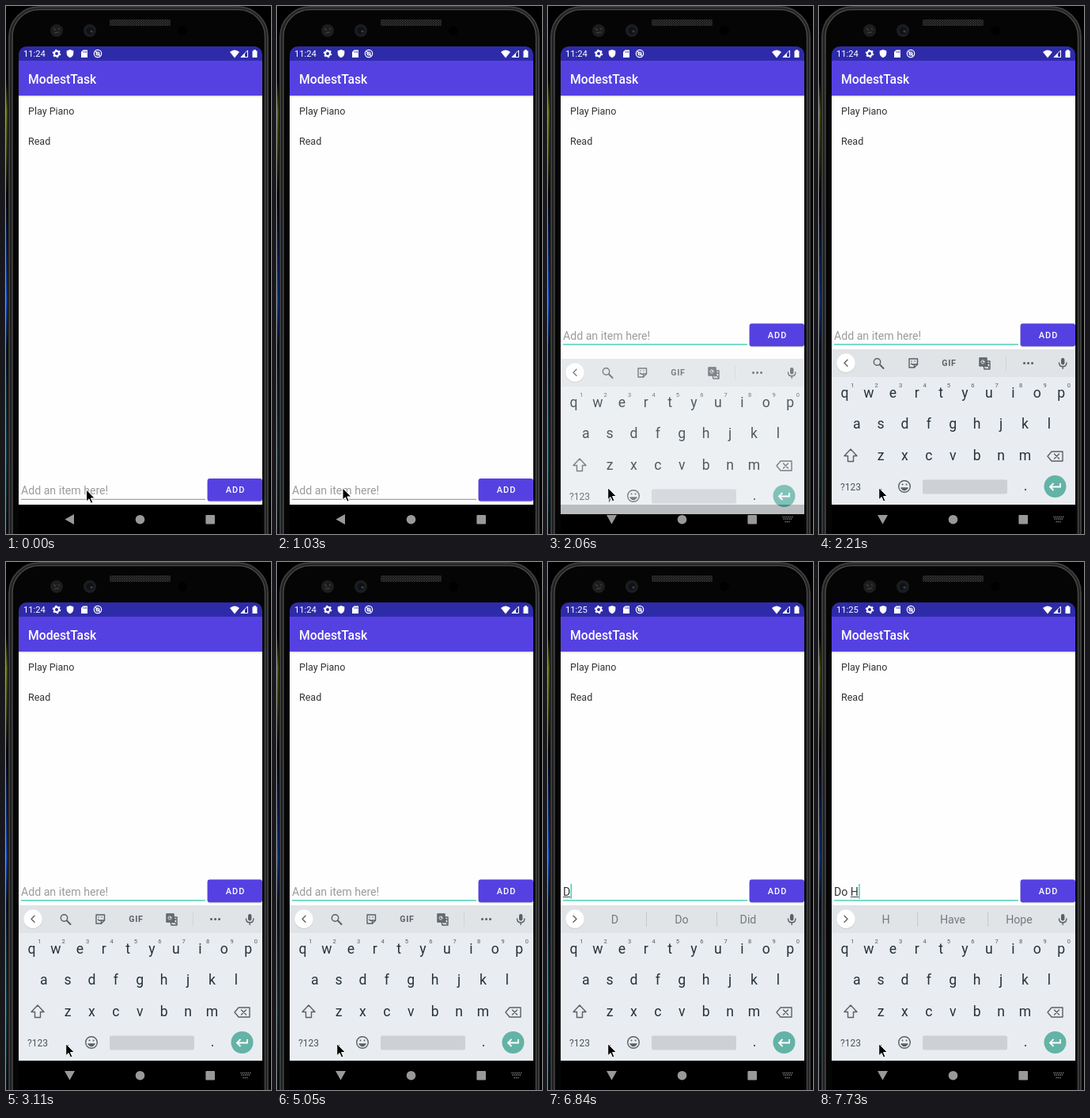
Write an HTML page that moves like this. It is 335 px wide and 666 px high and loops after 8 s.

```html
<!DOCTYPE html>
<html lang="en">
<head>
<meta charset="utf-8">
<style>
html, body { margin: 0; width: 100%; height: 100%; overflow: hidden; background: #000; }
svg { display: block; font-family: Roboto, sans-serif; }
text { white-space: pre; }
.mid { text-anchor: middle; }
.line { fill: none; stroke: #5b6065; stroke-width: 1.4; stroke-linejoin: round; stroke-linecap: round; }
</style>
</head>
<body>
<svg width="335" height="666" viewBox="0 0 335 666">
  <defs>
    <linearGradient id="wall" x2="0" y2="1">
      <stop offset=".14" stop-color="#000"/><stop offset=".2" stop-color="#5a6a10"/>
      <stop offset=".27" stop-color="#39460c"/><stop offset=".36" stop-color="#04060c"/>
      <stop offset=".48" stop-color="#0a2a70"/><stop offset=".56" stop-color="#0c48b8"/>
      <stop offset=".65" stop-color="#05142c"/><stop offset=".85" stop-color="#0a3a48"/>
      <stop offset="1" stop-color="#04141a"/>
    </linearGradient>
    <pattern id="mesh" width="3" height="3" patternUnits="userSpaceOnUse">
      <path d="M0 0L3 3M3 0L0 3" stroke="#3a3a3a" stroke-width=".7"/>
    </pattern>
  </defs>

  <!-- phone body -->
  <rect width="2" height="666" fill="url(#wall)"/>
  <rect x="4" y="1" width="327" height="720" rx="38" fill="#202020" stroke="#3c3c3c" stroke-width="2"/>
  <rect x="8" y="4.5" width="319.5" height="720" rx="34" fill="#050505" stroke="#484848" stroke-width="1.5"/>
  <rect x="131" y="17" width="77" height="8" rx="2" fill="#151515"/>
  <rect x="131" y="17" width="77" height="8" rx="2" fill="url(#mesh)"/>
  <g fill="#1d1d1f"><circle cx="64" cy="31" r="8"/><circle cx="106" cy="31" r="8"/></g>
  <path d="M60 28l3 3M66 28l2 2M61 34l6-1" stroke="#3c3c3c" stroke-width="1.5"/>
  <circle cx="106" cy="31" r="4.5" fill="#0c1218"/><circle cx="108" cy="32" r="1.6" fill="#34424e"/>
  <circle cx="223" cy="31" r="6" fill="#000"/>

  <!-- app -->
  <rect x="16" y="69" width="308" height="560" fill="#fefefe"/>
  <path d="M16 69V61a10 10 0 0 1 10-10H314a10 10 0 0 1 10 10V69Z" fill="#2e2ba9"/>
  <rect x="16" y="113" width="308" height="1.5" fill="#ddd"/>
  <rect x="16" y="69" width="308" height="44" fill="#5541e1"/>
  <g fill="#fff">
    <text id="clock" x="22" y="64" font-size="11.2"></text>
    <circle cx="64" cy="60" r="3.1" fill="none" stroke="#fff" stroke-width="2.2"/>
    <circle cx="64" cy="60" r="4.6" fill="none" stroke="#fff" stroke-width="1.4" stroke-dasharray="2.2 2.6"/>
    <path d="M81 55l4.3 1.6v3q0 4-4.3 5.6q-4.3-1.6-4.3-5.6v-3Z"/>
    <path d="M97.5 55.5H103V65H95V58Z"/>
    <path d="M98 57v2M100 57v2M101.7 57v2" stroke="#2e2ba9" stroke-width=".8"/>
    <circle cx="116" cy="60" r="4.7" fill="none" stroke="#fff" stroke-width="1.2"/>
    <circle cx="116" cy="60" r="2" fill="none" stroke="#fff" stroke-width="1.2"/>
    <path d="M113 57l6 6" stroke="#fff" stroke-width="1.1"/>
    <path d="M289 65.5l-6-7.5q6-5 12 0Z"/>
    <path d="M305.5 56v8.5h-8.5Z" fill="none" stroke="#fff"/><path d="M302 59.5v5h-5Z"/>
    <path d="M311.5 56.5h1.5v-1.3h3v1.3h1.5V65h-6Z"/>
    <text x="28" y="97.7" font-size="15.7" font-weight="500">ModestTask</text>
  </g>
  <g font-size="12.5" fill="#333">
    <text x="28" y="137">Play Piano</text><text x="28" y="174.6">Read</text>
  </g>
  <g id="form">
    <text id="entry" x="19" y="421" font-size="14.15"></text>
    <rect id="rule" x="19" width="233"/>
    <path id="under" stroke="#444"/>
    <rect id="caret" y="406" width="1.4" height="19" fill="#3acdb4"/>
    <rect x="254.7" y="402" width="69.3" height="28.3" rx="3" fill="#ccc"/>
    <rect x="254.6" y="400.6" width="69.4" height="28.6" rx="3" fill="#5541e1"/>
    <text x="290" y="419" class="mid" font-size="11" font-weight="500" letter-spacing=".95" fill="#fff">ADD</text>
  </g>

  <!-- navigation bar -->
  <rect x="16" y="629" width="308" height="37" fill="#000"/>
  <g fill="#999">
    <path id="back" d="M-6 0L5.5 -6.5V6.5Z"/>
    <circle cx="169.5" cy="647.7" r="5.8"/><rect x="252.4" y="642" width="11.6" height="11.6" rx="1"/>
    <path id="switch" d="M296.5 644.5h13M297.5 647h11M299.5 650.5h7" stroke="#858585" stroke-width="1.3" stroke-dasharray="1.3 1"/>
  </g>

  <!-- keyboard -->
  <g id="board">
    <rect x="16" y="433" width="308" height="196" fill="#e9edf1"/>
    <rect x="16" y="433" width="308" height="35" fill="#e0e4e7"/>
    <circle cx="34" cy="451" r="12" fill="#ccd0d3"/><circle cx="34" cy="450.3" r="11.7" fill="#fff"/>
    <path id="chev" class="line" d="M2-4L-2 0L2 4"/>
    <g id="tools" class="line">
      <circle cx="73.5" cy="449" r="4.2"/><path d="M77 452.5l4.5 4.5" stroke-width="2"/>
      <path d="M114 445h10.5v7l-4 4H114Z"/><path d="M124.5 452h-4v4M116.5 451q1.5 2 3.5 1M117 448h.1M121 448h.1"/>
      <text x="164.4" y="454.3" class="mid" font-size="10.6" font-weight="700" letter-spacing=".8" fill="#5b6065" stroke="none">GIF</text>
      <path d="M207 448h9v10h-7Z"/><rect x="203" y="444" width="9" height="10" fill="#6b7075"/>
      <path d="M211 451h4M213 450v1q0 3-2 4M212 453l3 3"/>
      <path d="M209 448.5h-1.7M209 449a2 2 0 1 1-.5-1.4" stroke="#e0e4e7" stroke-width="1"/>
      <path d="M236.5 442v17" stroke="#d0d4d7" stroke-width="1"/>
      <path d="M259.5 450.5h.1M264.5 450.5h.1M269.5 450.5h.1" stroke-width="3"/>
    </g>
    <g id="hints" font-size="14.2" fill="#74797d">
      <path d="M124.5 441v19M213.5 441v19" stroke="#c5c9cc"/>
      <text class="mid" x="84.5" y="456"></text><text class="mid" x="169" y="456"></text><text class="mid" x="253" y="456"></text>
    </g>
    <rect x="306" y="444" width="4.4" height="8.5" rx="2.2" fill="#5b6065"/>
    <path class="line" d="M303.5 450q0 4.8 4.7 4.8t4.7-4.8M308.2 455v2.5"/>
    <g id="keys"></g>
    <g class="line">
      <path id="shift" d="M40 559l8 8.5h-4.5v7h-7v-7H32Z"/>
      <path d="M294 562h14v12h-14l-5-6Z"/><path d="M297.5 565l6 6M303.5 565l-6 6"/>
      <circle cx="108" cy="606" r="7.3"/><path d="M104 608q4 5 8 0Z" fill="#5b6065"/>
      <path d="M105.5 603.5h.1M110.5 603.5h.1" stroke-width="2"/>
    </g>
    <text class="mid" x="40" y="610.5" font-size="12" fill="#4c5358">?123</text>
    <rect x="131" y="597.5" width="107" height="18" rx="2" fill="#cdd1d5"/>
    <circle cx="298.5" cy="606" r="14" fill="#63b3a6"/>
    <path d="M305 602v4.5h-12.5M296.5 602l-4.5 4.5l4.5 4.5" fill="none" stroke="#fff" stroke-width="1.8"/>
  </g>

  <path id="mouse" d="M0 0V15L3.4 11.8L5.8 17.2L8.2 16.2L5.8 10.9H10.7Z" fill="#000" stroke="#fff"/>
</svg>
<script>
const $ = id => document.getElementById(id);
const set = (id, attrs) => { for (const k in attrs) $(id).setAttribute(k, attrs[k]); };
const show = (id, on) => set(id, { visibility: on ? 'visible' : 'hidden' });
// value of the last [time, value] entry already reached
const at = (t, list) => list.filter(e => e[0] <= t).pop()[1];

function key(s, x, y, size = 17.6, color = '#263238') {
  const el = document.createElementNS('http://www.w3.org/2000/svg', 'text');
  const attrs = { x, y, 'font-size': size, fill: color, class: 'mid' };
  for (const k in attrs) el.setAttribute(k, attrs[k]);
  el.textContent = s;
  $('keys').append(el);
  return el;
}
const letters = [];
[['qwertyuiop', 32.5, 494], ['asdfghjkl', 47.7, 533.3], ['zxcvbnm', 78, 573]].forEach(([row, x0, y], r) =>
  [...row].forEach((c, i) => {
    const x = x0 + i * 30.4;
    letters.push(key(c, x, y));
    if (!r) key((i + 1) % 10, x + 9.8, 481, 7.5, '#555b60');
  }));
key(',', 78, 611);
key('.', 261, 611);

const typing = [[0, ''], [6840, 'D'], [6990, 'Do'], [7130, 'Do '], [7580, 'Do H']];
const words = [[0, ''], [6840, 'D Do Did'], [6990, 'Do Don’t Dog'], [7130, 'you not it'], [7730, 'H Have Hope']];
const caretOn = [[0, 0], [1480, 1], [2060, 0], [2510, 1], [3110, 0], [3560, 1], [4000, 0], [4600, 1],
  [5050, 0], [5650, 1], [6100, 0], [6540, 1]];
const mouse = [[0, [101.6, 610]], [740, [97, 609.5]], [890, [90, 608.7]], [1030, [83, 608]], [1180, [75.7, 607.7]]];

function draw(t) {
  const focus = t >= 1480, up = t >= 1770, text = at(t, typing), hints = at(t, words);
  $('clock').textContent = t < 6540 ? '11:24' : '11:25';
  set('mouse', { transform: `translate(${at(t, mouse)})` });

  set('form', { transform: `translate(0 ${up ? 0 : 195.3})` });
  set('rule', focus ? { y: 426.2, height: 1.4, fill: '#45cfb8' } : { y: 426.5, height: 1, fill: '#8c8c8c' });
  const entry = $('entry');
  entry.textContent = text || 'Add an item here!';
  set('entry', { fill: text ? '#333' : '#9b9b9b' });
  const end = 19 + (text ? entry.getComputedTextLength() : 0);
  set('caret', { x: end + .3 });
  show('caret', at(t, caretOn));
  const start = text.lastIndexOf(' ') + 1;
  const from = 19 + (start ? entry.getSubStringLength(0, start) : 0);
  set('under', { d: text && start < text.length ? `M${from} 422.5H${end}` : '' });

  const angle = at(t, [[0, 0], [1630, -35], [1770, -70], [1920, -90]]);
  set('back', { transform: `translate(80.5 647.5) rotate(${angle})` });
  show('switch', t >= 1770);

  show('board', t >= 2060);
  const sliding = t < 2210;
  set('board', { transform: `translate(0 ${sliding ? 12 : 0})`, opacity: sliding ? .8 : 1 });
  set('chev', { transform: `translate(34 450.3) scale(${hints ? -1 : 1} 1)` });
  $('tools').style.display = hints ? 'none' : '';
  $('hints').style.display = hints ? '' : 'none';
  const list = hints.split(' ');
  document.querySelectorAll('#hints text').forEach((el, i) => el.textContent = list[i] || '');

  const caps = t >= 6690 && t < 6840;
  letters.forEach(el => el.textContent = caps ? el.textContent.toUpperCase() : el.textContent.toLowerCase());
  set('shift', { fill: caps ? '#5b6065' : 'none' });
}

const begin = performance.now();
function loop() {
  draw((performance.now() - begin) % 8000);
  requestAnimationFrame(loop);
}
loop();
</script>
</body>
</html>
```
